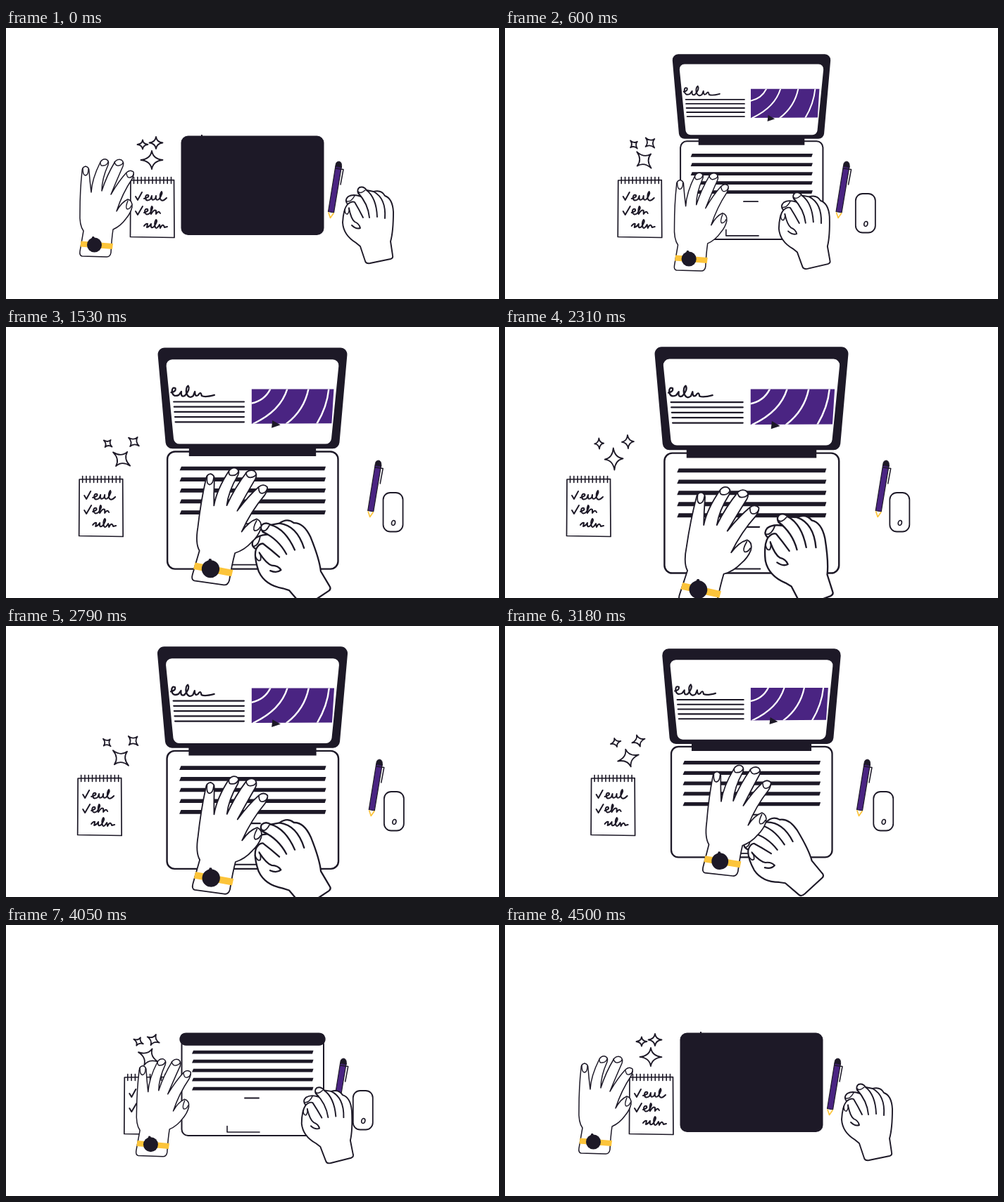
An HTML page with a canvas for the animation above (4.53 s loop, 700 px wide and 386 px high).

```html
<!DOCTYPE html>
<html lang="en">
<head>
<meta charset="utf-8">
<title>Desk at work</title>
<style>
html, body { margin: 0; width: 100%; height: 100%; overflow: hidden; background: #fff; }
canvas { display: block; width: 700px; height: 386px; }
</style>
</head>
<body>
<canvas id="stage" width="700" height="386"></canvas>
<script>
const ctx = document.getElementById('stage').getContext('2d');
const LOOP = 4530, PEAK = 2150;
const INK = '#1d1927', PURPLE = '#4a2482', YELLOW = '#fcc43a', WHITE = '#fff';

const shapes = {
  leftHand: new Path2D('M108 325Q104 324 105 318L110 289Q104 281 105 262C105 240 106 222 108 204Q108 198 113 197Q118 198 118 204Q119 218 121 234Q122 215 134 191Q137 186 142 187Q147 189 145 195Q136 215 136 232Q143 210 155 190Q159 186 164 188Q168 191 166 197Q158 215 149 237Q160 218 171 206Q176 201 181 205Q182 209 179 215Q165 236 157 261Q164 248 173 244Q180 246 179 255Q177 264 170 272Q163 282 152 287Q150 300 149 320Q148 326 143 326Z'),
  leftNails: new Path2D('M109 200Q109 210 113 210Q117 209 117 201M134 192Q134 197 138 196Q143 196 145 191M154 191Q156 197 160 196Q165 195 166 192M171 207Q172 214 176 213Q180 212 181 208M173 246Q169 256 172 258Q176 258 178 253'),
  rightHand: new Path2D('M510 332Q511 336 517 335L546 329Q550 328 549 324L546 304Q550 290 550 262Q549 243 538 239Q533 230 522 233L512 231Q508 225 502 227Q498 230 500 235L504 240Q493 236 486 240Q480 245 485 251Q479 258 478 277Q479 295 497 306L503 311Z'),
  rightLines: new Path2D('M500 235Q514 250 516 270M512 231Q526 242 527 269M522 233Q540 243 538 271M485 251Q491 246 495 248Q501 258 507 270M487 257Q490 272 495 276Q502 279 503 285Q497 287 491 281'),
  rightNails: new Path2D('M500 233Q503 237 510 231M484 247Q490 248 495 239M481 258Q481 266 485 265Q488 261 487 256'),
  notes: new Path2D('M184 240L187 245L193 234M184 261L187 266L194 254M196 243Q204 241 202 238Q198 237 198 242Q199 248 205 244L207 239Q206 248 212 243L213 239Q212 247 217 244Q223 236 221 233Q218 236 219 243Q221 249 228 242M196 263Q203 261 201 258Q197 257 197 262Q199 268 204 264Q210 256 207 254Q205 258 206 265Q210 258 213 260L213 265Q217 259 219 264M196 282Q199 278 201 279L200 284Q204 283 206 279Q205 287 210 283Q216 275 213 273Q210 277 212 284Q214 287 218 280L219 285Q223 277 225 284L229 283'),
  headline: new Path2D('M254 91Q260 90 259 86Q255 84 255 90Q256 97 263 94L266 90Q265 97 270 95Q277 87 274 83Q271 85 272 92Q275 99 280 95L282 90Q282 97 286 94Q289 89 290 95Q294 97 305 94'),
  waves: new Path2D('M371 87Q364 101 348 104M391 87Q383 113 351 128M416 87Q411 112 390 128M440 87Q438 108 426 128')
};

// Poses: time, anchor x, anchor y, turn in degrees
const leftPoses = [
  [60, 125, 309, 0], [600, 261, 328, 0], [1530, 300, 300, 6.5], [2310, 288, 319, 8.3],
  [3180, 310, 305, 4.6], [3690, 279, 316, 1.2], [4430, 125, 309, 0]
];
const rightPoses = [
  [60, 549, 327, 0], [600, 461, 333, -1.5], [1530, 442, 323, -22], [2310, 444, 324, -9],
  [3180, 440, 322.5, -31], [3690, 441, 332, -5], [4430, 549, 327, 0]
];

const clamp = v => Math.min(1, Math.max(0, v));
const wave = v => (1 - Math.cos(Math.PI * clamp(v))) / 2;
const span = (t, a, b) => wave((t - a) / (b - a));
const mix = (a, b, v) => a + (b - a) * v;

function poseAt(poses, t) {
  const next = poses.findIndex(p => p[0] > t);
  if (next === 0) return poses[0];
  if (next < 0) return poses[poses.length - 1];
  const a = poses[next - 1], b = poses[next];
  const v = span(t, a[0], b[0]);
  return a.map((n, i) => mix(n, b[i], v));
}

function lidAngle(t) {
  if (t < 687) return mix(-1.16, 1.11, span(t, 67, 687));
  if (t < 3000) return mix(1.11, 1, span(t, 687, 920));
  return mix(1, -1.16, span(t, 3615, 4465));
}

function group(draw) {
  ctx.save();
  draw();
  ctx.restore();
}

function ink(path, width, fill) {
  if (fill) {
    ctx.fillStyle = fill;
    ctx.fill(path);
  }
  ctx.strokeStyle = INK;
  ctx.lineWidth = width;
  ctx.stroke(path);
}

function poly(points, color) {
  ctx.beginPath();
  points.forEach(([x, y]) => ctx.lineTo(x, y));
  ctx.closePath();
  ctx.fillStyle = color;
  ctx.fill();
}

function roundBox(x, y, w, h, r) {
  const path = new Path2D();
  path.roundRect(x, y, w, h, r);
  return path;
}

function line(x1, y1, x2, y2, width, color = INK) {
  ctx.beginPath();
  ctx.moveTo(x1, y1);
  ctx.lineTo(x2, y2);
  ctx.lineWidth = width;
  ctx.strokeStyle = color;
  ctx.stroke();
}

// Four-sided shape, symmetric about x = 350, with rounded corners
function trapezoid(yFar, halfFar, yNear, halfNear, r, color) {
  const radius = Math.min(r, Math.abs(yNear - yFar) / 2);
  const corners = [[350 + halfFar, yFar], [350 + halfNear, yNear], [350 - halfNear, yNear], [350 - halfFar, yFar]];
  ctx.beginPath();
  ctx.moveTo(350, yFar);
  corners.forEach(([x, y], i) => {
    const [nx, ny] = corners[i + 1] || [350, yFar];
    ctx.arcTo(x, y, nx, ny, radius);
  });
  ctx.closePath();
  ctx.fillStyle = color;
  ctx.fill();
}

function notepad(p) {
  group(() => {
    ctx.translate(-90 * p, 0);
    ink(new Path2D('M177 217L238.5 216.5L239 298.5L176.5 297.5Z'), 1.7, WHITE);
    for (let i = 0; i < 11; i++) line(181.5 + i * 5.3, 212.5, 181.5 + i * 5.3, 221.5, 1.6);
    ink(shapes.notes, 2);
  });
}

function star(x, y, rx, ry, turn) {
  group(() => {
    ctx.translate(x, y);
    ctx.rotate(turn);
    ctx.beginPath();
    ctx.moveTo(0, -ry);
    for (const [sx, sy, flat] of [[1, -1, 1], [1, 1, 0], [-1, 1, 1], [-1, -1, 0]]) {
      ctx.quadraticCurveTo(sx * rx * .12, sy * ry * .12, flat ? sx * rx : 0, flat ? 0 : sy * ry);
    }
    ctx.closePath();
    ctx.strokeStyle = INK;
    ctx.lineWidth = 1.8;
    ctx.stroke();
  });
}

function stars(p) {
  const turn = p * Math.PI * 1.5;
  star(207 - 53 * p, 188, 15.5, 13, turn);
  star(194 - 61 * p, 166, 7.5, 6.5, turn);
  star(213 - 39 * p, 163.5, 9.5, 8.5, turn);
}

function pen(p) {
  group(() => {
    ctx.translate(69.5 * p, 0);
    ink(new Path2D('M468 196L476.5 197L465.5 263L457.5 261.5Z'), 1.2, PURPLE);
    ink(new Path2D('M468 197Q467.5 190 473 190Q477.5 191 476.5 198.5Z'), .8, INK);
    ctx.beginPath();
    ctx.moveTo(458, 263);
    ctx.lineTo(460.5, 270.5);
    ctx.lineTo(465, 264);
    ctx.strokeStyle = YELLOW;
    ctx.lineWidth = 1.7;
    ctx.stroke();
    ink(new Path2D('M468 200L479 201.5L475 223'), 1.5);
  });
}

function mouse(p) {
  if (p < .01) return;
  group(() => {
    ctx.translate(501 + 60 * p, 264);
    ink(roundBox(-14, -28, 28, 55.5, 10), 1.8, WHITE);
    ctx.beginPath();
    ctx.ellipse(.5, 15, 2.5, 3.5, .2, 0, 7);
    ctx.lineWidth = 1.6;
    ctx.stroke();
  });
}

function keyboard() {
  ink(roundBox(249.5, 161, 201.5, 139, 9), 2, WHITE);
  for (let i = 0; i < 5; i++) {
    const y = 178.7 + i * 13;
    poly([[266, y], [436.5, y], [435, y + 4.7], [264, y + 4.7]], INK);
  }
  line(339, 246.5, 359, 246.5, 1.8);
  ink(new Path2D('M314 286.5L314 295L360 295'), 1.6);
}

function screen() {
  trapezoid(52, 102.5, 152, 92.5, 7, WHITE);
  ink(shapes.headline, 1.9);
  for (let i = 0; i < 5; i++) line(257 + i * .5, 102 + i * 6, 340, 102 + i * 6, 1.8);
  group(() => {
    poly([[349, 87], [446, 87], [443.5, 127.5], [349, 128]], PURPLE);
    ctx.clip();
    ctx.strokeStyle = WHITE;
    ctx.lineWidth = 2;
    ctx.stroke(shapes.waves);
  });
  poly([[373.5, 124], [383, 129.5], [372.5, 133]], INK);
}

function lid(k) {
  const opened = clamp((k + 1.16) / 2.16);
  const half = mix(101.5, 112, opened);
  if (k < 0) {
    trapezoid(157 - 119 * k, half, 153.5, 101.5, 10, INK);
    if (k < -1.1) poly([[277, 152], [279, 152], [279, 155], [277, 155]], INK);
    return;
  }
  poly([[275, 153], [425, 153], [425, 166.5], [275, 166.5]], INK);
  group(() => {
    ctx.translate(350, 157);
    ctx.scale(half / 112, k);
    ctx.translate(-350, -157);
    trapezoid(38, 112.5, 157.5, 102, 8, INK);
    screen();
  });
}

function placeHand([, x, y, turn], anchorX, anchorY, draw) {
  group(() => {
    ctx.translate(x, y);
    ctx.rotate(turn * Math.PI / 180);
    ctx.translate(-anchorX, -anchorY);
    draw();
  });
}

function rightHand() {
  ink(shapes.rightHand, 1.9, WHITE);
  ink(shapes.rightLines, 1.9);
  ink(shapes.rightNails, 1.5);
}

function leftHand() {
  ink(shapes.leftHand, 1.5, WHITE);
  ink(shapes.leftNails, 1.4);
  poly([[106.5, 303.5], [152, 307], [151, 315], [105.5, 311.5]], YELLOW);
  ctx.beginPath();
  ctx.arc(125.5, 309, 10.5, 0, 7);
  ctx.fillStyle = INK;
  ctx.fill();
  poly([[121.5, 300], [122.5, 297], [125, 297], [126, 300]], INK);
}

function render(t) {
  const spread = t < PEAK ? wave(t / PEAK) : 1 - span(t, PEAK, LOOP);
  const zoom = clamp((spread - .11) / .89);
  const scale = 1 + .23 * zoom * zoom * (3 - 2 * zoom);

  ctx.fillStyle = WHITE;
  ctx.fillRect(0, 0, 700, 386);
  ctx.lineJoin = ctx.lineCap = 'round';

  notepad(spread);
  stars(spread);
  mouse(spread);
  pen(spread);
  group(() => {
    ctx.translate(350, 80);
    ctx.scale(scale, scale);
    ctx.translate(-350, -80);
    const k = lidAngle(t);
    if (k > -1.15) keyboard();
    lid(k);
    placeHand(poseAt(rightPoses, t), 549, 327, rightHand);
    placeHand(poseAt(leftPoses, t), 125, 309, leftHand);
  });
}

const start = performance.now();
function tick() {
  render((performance.now() - start) % LOOP);
  requestAnimationFrame(tick);
}
tick();
</script>
</body>
</html>
```
